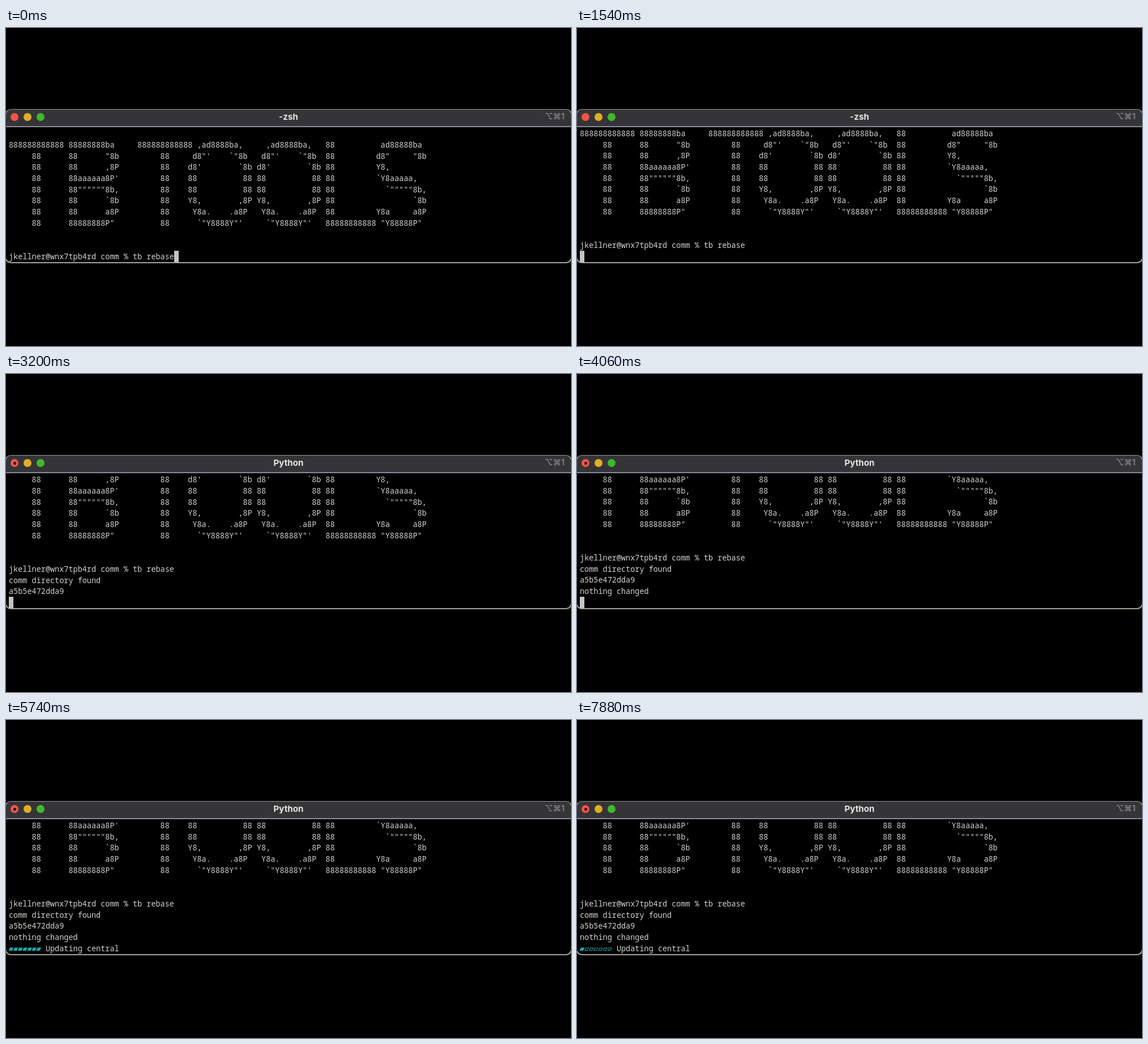
An HTML page that plays this animation: 998x561 px, repeating every 8000 ms.

```html
<!DOCTYPE html>
<html lang="en">
<head>
<meta charset="utf-8">
<title>Terminal</title>
<style>
:root { --row: 19.69px; --col: 8.113px; --loop: 8s step-end infinite; }
html, body { margin: 0; width: 100%; height: 100%; overflow: hidden; background: #000; }
#stage { position: relative; width: 998px; height: 561px; overflow: hidden; }
#stage div, #stage pre, #stage svg { position: absolute; box-sizing: border-box; margin: 0; }

#win { left: -2px; top: 143px; width: 1002px; height: 272px; border: 2px solid #a2a296; border-top: 1px solid #98989a; border-radius: 11px; overflow: hidden; }
#bar { left: 0; top: 0; width: 100%; height: 31px; background: #353537; border-bottom: 2px solid #8d86a0; }
.light { top: 150px; width: 14px; height: 14px; border-radius: 50%; }
#dot { left: 4.5px; top: 4.5px; width: 5px; height: 5px; border-radius: 50%; background: #2a0504; animation: dot var(--loop); }
.title { left: 0; top: 146px; width: 998px; text-align: center; font: 700 15.2px/21px Inter, sans-serif; color: #e6e6e6; }
.hint { right: 11.5px; top: 144.5px; font: 600 14.4px/21px Inter, "DejaVu Sans", sans-serif; color: #858587; }
#zsh { animation: zsh var(--loop); }
#env { animation: env var(--loop); }
#py { animation: py var(--loop); }

pre, #status { font: 500 13.52px/var(--row) "Noto Sans Mono", "DejaVu Sans Mono", monospace; color: #d2d2cc; white-space: pre; font-variant-ligatures: none; }
#view { left: 0; top: 177.3px; width: 998px; height: calc(12 * var(--row)); overflow: hidden; animation: view var(--loop); }
#log { left: 5px; top: 0; animation: scroll var(--loop); }
#cursor { left: 297px; top: 393px; width: 8px; height: 20px; background: #c4c4c4; animation: cursor var(--loop); }
#status { left: 0; top: 393.9px; height: var(--row); animation: status var(--loop); }
#label { left: calc(5px + 8 * var(--col)); top: 0; }
#empty, #full { left: 5px; top: 7.5px; width: calc(7 * var(--col)); height: 7px; overflow: hidden; }
#full { animation: fill var(--loop); }

@keyframes scroll {
  0% { transform: none; }
  17.5% { transform: translateY(calc(-1 * var(--row))); }
  28% { transform: translateY(calc(-2 * var(--row))); }
  35% { transform: translateY(calc(-3 * var(--row))); }
  47.25%, 100% { transform: translateY(calc(-4 * var(--row))); }
}
/* the bottom row stays empty once the command is sent */
@keyframes view { 0% { height: calc(12 * var(--row)); } 17.5%, 100% { height: calc(11 * var(--row)); } }
@keyframes cursor {
  0% { left: 297px; visibility: visible; }
  17.5% { left: 5px; visibility: visible; }
  54%, 100% { left: 5px; visibility: hidden; }
}
@keyframes zsh { 0% { visibility: visible; } 20%, 100% { visibility: hidden; } }
@keyframes env { 0% { visibility: hidden; } 20% { visibility: visible; } 35%, 100% { visibility: hidden; } }
@keyframes py { 0% { visibility: hidden; } 35%, 100% { visibility: visible; } }
@keyframes dot { 0% { visibility: hidden; } 29%, 100% { visibility: visible; } }
@keyframes status { 0% { visibility: hidden; } 54%, 100% { visibility: visible; } }
@keyframes fill {
  0%, 73.75%, 96.25%, 100% { width: var(--col); }
  57%, 79.25% { width: calc(2 * var(--col)); }
  59.75%, 82.25% { width: calc(3 * var(--col)); }
  63%, 84.5% { width: calc(4 * var(--col)); }
  65.5%, 87.5% { width: calc(5 * var(--col)); }
  68.5%, 91.25% { width: calc(6 * var(--col)); }
  70.75%, 93.25% { width: calc(7 * var(--col)); }
}
</style>
</head>
<body>
<div id="stage">
  <div id="win"><div id="bar"></div></div>
  <div class="light" style="left:8px;background:#f4524a"><div id="dot"></div></div>
  <div class="light" style="left:31.2px;background:#dfae26"></div>
  <div class="light" style="left:54.4px;background:#3fb92b"></div>
  <div class="title" id="zsh">-zsh</div>
  <div class="title" id="env">env</div>
  <div class="title" id="py">Python</div>
  <div class="hint">⌥⌘1</div>

  <div id="view"><pre id="log">

888888888888 88888888ba     888888888888 ,ad8888ba,     ,ad8888ba,   88          ad88888ba
     88      88      "8b         88     d8"'    `"8b   d8"'    `"8b  88         d8"     "8b
     88      88      ,8P         88    d8'        `8b d8'        `8b 88         Y8,
     88      88aaaaaa8P'         88    88          88 88          88 88         `Y8aaaaa,
     88      88""""""8b,         88    88          88 88          88 88           `"""""8b,
     88      88      `8b         88    Y8,        ,8P Y8,        ,8P 88                 `8b
     88      88      a8P         88     Y8a.    .a8P   Y8a.    .a8P  88         Y8a     a8P
     88      88888888P"          88      `"Y8888Y"'     `"Y8888Y"'   88888888888 "Y88888P"


jkellner@wnx7tpb4rd comm % tb rebase
comm directory found
a5b5e472dda9
nothing changed
</pre></div>

  <div id="cursor"></div>
  <div id="status">
    <svg width="0" height="0"><defs>
      <pattern id="hollow" width="8.113" height="7" patternUnits="userSpaceOnUse"><path d="M2.5 1.2H7.3L5.4 5.6H.7Z" fill="none" stroke="#14a5aa"/></pattern>
      <pattern id="solid" width="8.113" height="7" patternUnits="userSpaceOnUse"><path d="M2.2 .7H8.1L5.8 6.1H0Z" fill="#12b0b4"/></pattern>
    </defs></svg>
    <div id="empty"><svg width="57" height="7"><rect width="57" height="7" fill="url(#hollow)"/></svg></div>
    <div id="full"><svg width="57" height="7"><rect width="57" height="7" fill="url(#solid)"/></svg></div>
    <div id="label">Updating central</div>
  </div>
</div>
</body>
</html>
```
